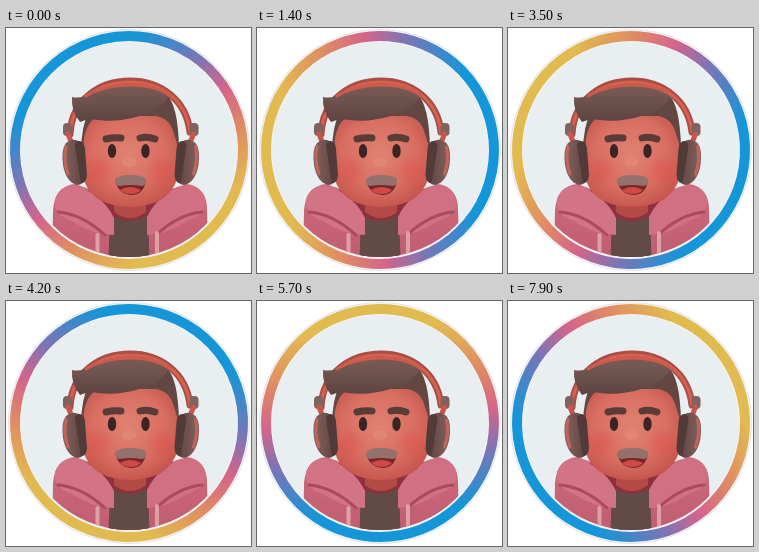
An HTML page that plays this animation: 245x245 px, repeating every 8000 ms.

```html
<!DOCTYPE html>
<html lang="en">
<meta charset="utf-8">
<title>Avatar with spinning ring</title>
<style>
  html, body { margin: 0; width: 100%; height: 100%; overflow: hidden; background: #fff }
  svg { display: block; width: 100vw; height: 100vh }
</style>
<svg viewBox="0 0 245 245">
  <defs>
    <linearGradient id="ring" gradientUnits="userSpaceOnUse" x1="123" y1="3" x2="123" y2="241">
      <stop offset=".12" stop-color="#1496d8"/>
      <stop offset=".34" stop-color="#7676b8"/>
      <stop offset=".52" stop-color="#d5648a"/>
      <stop offset=".7" stop-color="#e08c62"/>
      <stop offset=".9" stop-color="#e2bb50"/>
    </linearGradient>
    <radialGradient id="skin" cx=".48" cy=".42" r=".62">
      <stop offset="0" stop-color="#de8272"/>
      <stop offset=".6" stop-color="#d96f62"/>
      <stop offset="1" stop-color="#c4534b"/>
    </radialGradient>
    <linearGradient id="hair" x2="0" y2="1">
      <stop stop-color="#7a5d57"/>
      <stop offset="1" stop-color="#5d4340"/>
    </linearGradient>
    <linearGradient id="cloth" x2="0" y2="1">
      <stop stop-color="#cf6a7c"/>
      <stop offset="1" stop-color="#bd5a6e"/>
    </linearGradient>
    <linearGradient id="cup">
      <stop stop-color="#85625d"/>
      <stop offset="1" stop-color="#5c4240"/>
    </linearGradient>
    <filter id="soft" x="-50%" y="-50%" width="200%" height="200%"><feGaussianBlur stdDeviation="4"/></filter>
    <clipPath id="disc"><circle cx="123" cy="122" r="107"/></clipPath>
    <g id="phone">
      <rect x="57" y="95" width="9" height="13" rx="4" fill="#80625e"/>
      <path d="M62 106L66 116" stroke="#c9564a" stroke-width="5"/>
      <path d="M60 115Q67 109 74 114L79 149Q78 157 71 157Q60 154 57 137Q55 121 60 115Z" fill="url(#cup)"/>
      <path d="M72 113Q78 112 79 121L81 147Q80 156 75 155Q71 133 69 116Z" fill="#523a39"/>
      <path d="M60 119Q57 131 62 146" fill="none" stroke="#c0655a" stroke-width="3"/>
    </g>
  </defs>

  <circle cx="123" cy="122" r="120.500" fill="#f3f4f6" stroke="#e4e5e9"/>
  <circle cx="123" cy="122" r="108" fill="#e9eef0"/>

  <g clip-path="url(#disc)" stroke-linecap="round" stroke-linejoin="round">
    <!-- hoodie and shirt -->
    <path d="M46 245L47 182Q49 158 69 156L92 164H157L181 156Q201 159 201 182L203 245Z" fill="url(#cloth)"/>
    <path d="M76 161Q100 167 123 167T171 160L160 178L142 198V245H104V198L86 180Z" fill="#8f303d"/>
    <path d="M104 187Q123 198 142 187L144 245H102Z" fill="#624a47"/>
    <path d="M108 170H140V184Q124 196 108 184Z" fill="#b44a45"/>
    <path d="M49 171Q56 153 77 160Q99 171 108 190V207Q87 207 66 193Q47 187 49 171Z" fill="#d27485"/>
    <path d="M199 171Q192 153 171 159Q150 170 141 189V207Q160 207 181 193Q201 187 199 171Z" fill="#d07082"/>
    <path d="M52 184Q76 186 99 207M196 184Q173 186 150 207" fill="none" stroke="#a94a5e" stroke-width="3"/>
    <path d="M91.500 207V229M151 205V229" stroke="#dfa0a4" stroke-width="4"/>

    <!-- head -->
    <path d="M64 106C66 71 94 53 124 53S180 71 184 104" fill="none" stroke="#a94e47" stroke-width="7"/>
    <path d="M64 106C66 71 94 54 124 54S180 71 184 104" fill="none" stroke="#d7614f" stroke-width="3"/>
    <path d="M75 122Q76 75 104 62Q130 54 160 66Q172 76 173 120Z" fill="#634743"/>
    <path d="M78 110Q82 90 95 88H150Q164 90 168 106L173 122V142Q171 161 155 172Q140 179 124 179Q106 179 92 171Q77 160 76 141Z" fill="url(#skin)"/>
    <g fill="#dd4f49" opacity=".45" filter="url(#soft)">
      <ellipse cx="92" cy="143" rx="11" ry="12"/>
      <ellipse cx="156" cy="143" rx="11" ry="12"/>
    </g>
    <path d="M66 69Q76 71 84 65Q98 57 123 57Q147 56 164 67Q155 82 137 87Q112 95 92 92Q82 90 74 94Q65 83 66 69Z" fill="url(#hair)"/>
    <path d="M80 68Q98 57 124 57T164 68" fill="none" stroke="#cc5b4c" stroke-width="3"/>

    <!-- headphones -->
    <use href="#phone"/>
    <use href="#phone" transform="matrix(-1 0 0 1 249.500 0)"/>

    <!-- face -->
    <path d="M100 111Q108 109 115 110M134 110Q141 108 149 111" fill="none" stroke="#5b3b37" stroke-width="7"/>
    <g fill="#3a2426">
      <ellipse cx="106" cy="123" rx="4.200" ry="7"/>
      <ellipse cx="139.500" cy="123" rx="4.200" ry="7"/>
    </g>
    <ellipse cx="123.500" cy="134" rx="7" ry="5" fill="#e18675"/>
    <path d="M109 152Q124 148 140 152Q138 167 125 167Q112 166 109 152Z" fill="#77272b"/>
    <path d="M114 162Q124 156 135 162Q131 166 125 166Q118 166 114 162Z" fill="#d04a45"/>
    <path d="M109 152Q111 147 124 147T140 151Q141 157 136 158Q124 156 113 158Q108 157 109 152Z" fill="#94716d"/>
  </g>

  <circle id="spin" cx="123" cy="122" r="114" fill="none" stroke="url(#ring)" stroke-width="10"/>
</svg>
<script>
  // The ring turns in steps and starts over each second.
  const CYCLE = 1000, TICK = 100, STEP = 30, START = 325;
  const spin = document.getElementById("spin");

  function draw() {
    const tick = Math.floor(performance.now() % CYCLE / TICK);
    spin.setAttribute("transform", `rotate(${START + tick * STEP} 123 122)`);
    requestAnimationFrame(draw);
  }
  draw();
</script>
</html>
```
